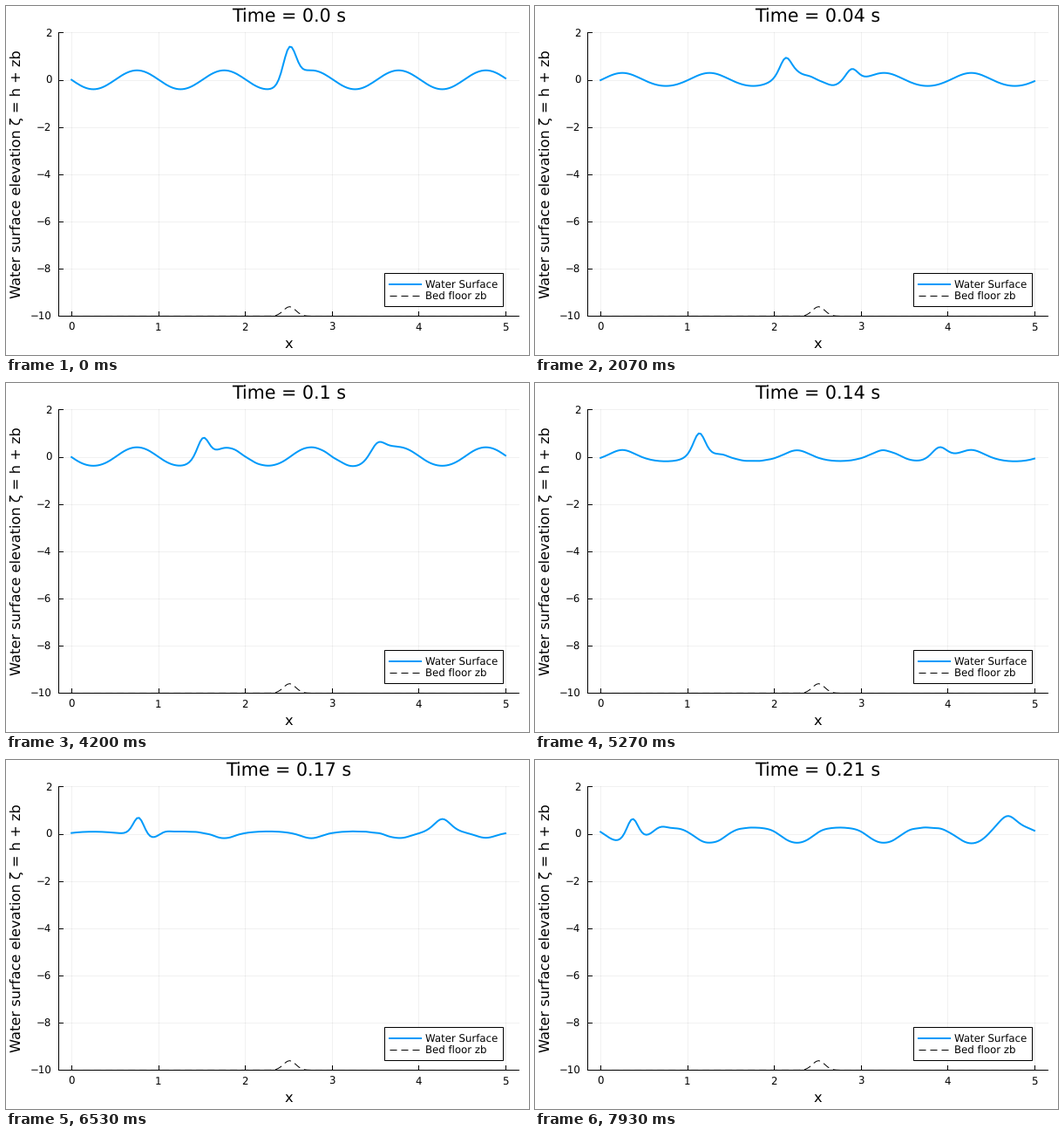
Recreate the animation shown at these times as a matplotlib script. Size 600 by 400 pixels, loop 8000 ms.

```python
import numpy as np
import matplotlib.pyplot as plt
from matplotlib.animation import FuncAnimation
from matplotlib.patches import Rectangle

W, H, DPI = 600, 400, 100
FRAMES, LOOP_MS = 120, 8000
N, LENGTH, G = 200, 5.0, 9.81
DX = LENGTH / N
BLUE = "#009AFA"
PX = 72 / DPI  # points per pixel

# Periodic nodes; the plot axis stretches them over the whole range
x = np.arange(N) * DX
x_plot = np.linspace(0, LENGTH, N)
hump = np.exp(-(x - 2.5) ** 2 / 0.01)
bed = -10 + 0.4 * hump

# Solver time per frame: tiny first steps, then adaptive ones near 0.002
times = np.interp(np.arange(FRAMES),
                  [9, 10, 11, 12, 13, 18, 45, 63, 79, 98, 119],
                  [0, 0.0001, 0.0003, 0.0008, 0.0019, 0.0117,
                   0.0655, 0.0993, 0.1367, 0.1746, 0.2148])


def ddx(f):
    return (np.roll(f, -1) - np.roll(f, 1)) / (2 * DX)


def rate(state):
    """Shallow water equations, split form, central differences."""
    h, q = state
    u = q / h
    dq = ddx(q)
    flux = 0.5 * (ddx(q * u) + q * ddx(u) + u * dq)
    return np.array([-dq, -flux - G * h * ddx(h + bed)])


def rk4(s, dt):
    a = rate(s)
    b = rate(s + dt / 2 * a)
    c = rate(s + dt / 2 * b)
    d = rate(s + dt * c)
    return s + dt / 6 * (a + 2 * b + 2 * c + d)


def solve():
    state = np.array([10 - 0.4 * np.sin(2 * np.pi * x) + hump, np.zeros(N)])
    surfaces = [state[0] + bed]
    for dt in np.diff(times):
        if dt > 0:
            for _ in range(3):
                state = rk4(state, dt / 3)
        surfaces.append(state[0] + bed)
    return surfaces


surfaces = solve()

plt.rcParams["font.family"] = "DejaVu Sans"
plt.rcParams["text.hinting"] = "none"
fig = plt.figure(figsize=(W / DPI, H / DPI), dpi=DPI, facecolor="white")
ax = fig.add_axes([0, 0, 1, 1])
ax.set_xlim(0, W)
ax.set_ylim(H, 0)
ax.axis("off")

LEFT, RIGHT, TOP, BOTTOM = 60.2, 588.2, 30.4, 355.4


def sx(v):
    return 75.2 + 99.56 * np.asarray(v)


def sy(v):
    return 84.58 - 27.09 * np.asarray(v)


def line(xs, ys, color="black", width=1.0, **kw):
    return ax.plot(xs, ys, color=color, lw=width * PX, **kw)[0]


def label(px, py, text, size, ha="center", **kw):
    return ax.text(px, py, text, fontsize=size * PX, ha=ha, va="baseline", **kw)


TICK, LABEL, TITLE = 11.8, 16.3, 20.7
DASH = dict(dashes=(8, 5), dash_capstyle="butt")

for v in range(6):
    line([sx(v)] * 2, [TOP, BOTTOM], alpha=0.055)
    line([sx(v)] * 2, [BOTTOM - 5, BOTTOM])
    label(sx(v), 371.5, str(v), TICK)
for v in range(-10, 3, 2):
    line([LEFT, RIGHT], [sy(v)] * 2, alpha=0.055)
    line([LEFT, LEFT + 5], [sy(v)] * 2)
    label(52.5, sy(v) + 4.4, str(v).replace("-", "\u2212"), TICK, ha="right")
line([LEFT, LEFT, RIGHT], [TOP, BOTTOM, BOTTOM])

label(324.2, 391.5, "x", LABEL)
label(16.5, 193, "Water surface elevation ζ = h + zb", LABEL,
      rotation=90, rotation_mode="anchor")
title = label(324.4, 18.4, "", TITLE)

water = line(sx(x_plot), sy(surfaces[0]), BLUE, 2)
line(sx(x_plot), sy(bed), **DASH)

ax.add_patch(Rectangle((434.2, 306.2), 136, 38.2, fc="white", ec="black",
                       lw=PX, zorder=3))
line([440, 476], [319.2] * 2, BLUE, 2, zorder=4)
line([440, 476], [331.8] * 2, zorder=4, **DASH)
label(481, 323, "Water Surface", TICK, ha="left", zorder=4)
label(480.6, 336, "Bed floor zb", TICK, ha="left", zorder=4)


def update(k):
    water.set_ydata(sy(surfaces[k]))
    title.set_text(f"Time = {round(float(times[k]), 2)} s")
    return water, title


anim = FuncAnimation(fig, update, frames=FRAMES, interval=LOOP_MS / FRAMES,
                     repeat=True, repeat_delay=0)
plt.show()
```
